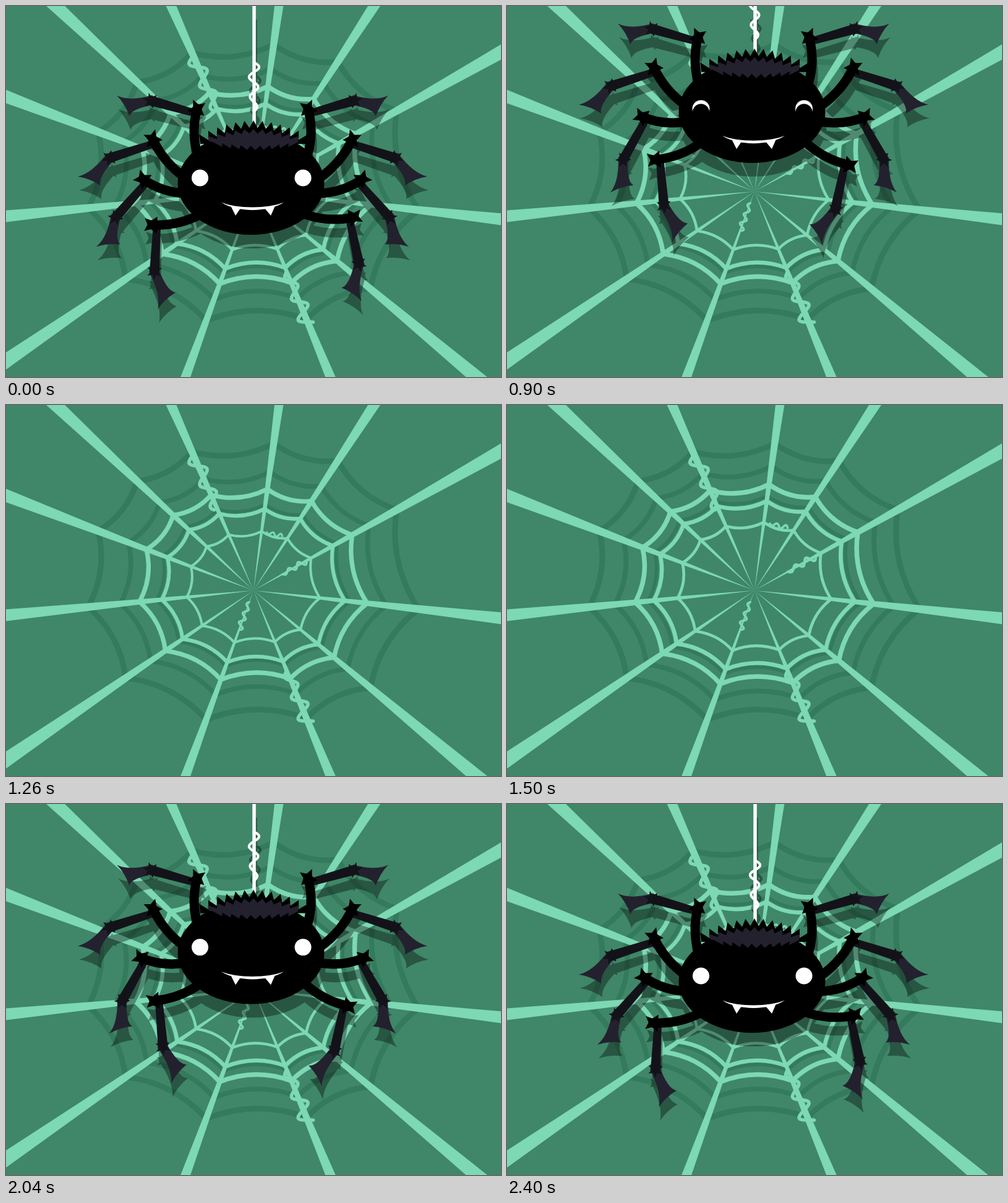
These frames come from a looping animation (800 by 600 pixels, 2820 ms). An HTML page:

```html
<!DOCTYPE html>
<html lang="en">
<head>
<meta charset="utf-8">
<title>Spider on a thread</title>
<style>
  html, body { margin: 0; width: 100%; height: 100%; overflow: hidden; background: #3f8768; }
  svg { display: block; width: 100%; height: 100%; }
  #spider { filter: drop-shadow(2px 22px 0 rgba(0, 0, 0, .36)); }
</style>
</head>
<body>
<svg id="stage" viewBox="0 0 800 600"></svg>
<script>
const LIGHT = '#7dd8b4', SHADE = '#347a5c', SHIN = '#131219', FOOT = '#23212e';
const CX = 400, CY = 300;
const { sin, cos, PI, exp, tanh, hypot } = Math;
const byId = id => document.getElementById(id);
const setTransform = (id, value) => byId(id).setAttribute('transform', value);
const range = (n, make) => Array.from({ length: n }, (_, i) => make(i));
const poly = (pts, fill) => `<polygon points="${pts.join(' ')}" fill="${fill}"/>`;
const line = (d, color, width) =>
  `<path d="${d}" fill="none" stroke="${color}" stroke-width="${width}" stroke-linecap="round"/>`;

// Points given as distance along and across the direction a to b, starting at a
function local([ax, ay], [bx, by], pts) {
  const l = hypot(bx - ax, by - ay), ux = (bx - ax) / l, uy = (by - ay) / l;
  return pts.map(([u, v]) => [ax + ux * u - uy * v, ay + uy * u + ux * v]);
}
const distance = (a, b) => hypot(b[0] - a[0], b[1] - a[1]);
const middle = (a, b) => [(a[0] + b[0]) / 2, (a[1] + b[1]) / 2];

// Wave from a to b whose amplitude goes from a0 to a1
function squiggle(a, b, waves, a0, a1, color, width) {
  const n = 60, len = distance(a, b);
  const pts = range(n + 1, i => [len * i / n, sin(i / n * waves * 2 * PI) * (a0 + (a1 - a0) * i / n)]);
  return line('M' + local(a, b, pts).join('L'), color, width);
}

// Web: spokes at hand-drawn angles, rings in a loose oval
const angles = [-136.8, -113.9, -82.2, -57, -29.4, 6.4, 39.8, 67.5, 110.1, 145.6, 174.3, 201].map(a => a * PI / 180);
const polar = (a, r) => [CX + cos(a) * r, CY + sin(a) * r];
const reach = a => 178 + 15 * cos(2 * a) - 8 * sin(a);
const onSpoke = (i, r) => polar(angles[i], r);

function ring(size) {
  return angles.map((angle, i) => {
    const next = angles[(i + 1) % angles.length];
    const a = polar(angle, reach(angle) * size), b = polar(next, reach(next) * size);
    const chord = distance(a, b);
    const [bend] = local(a, b, [[chord / 2, -chord * .19]]);
    const [sag] = local(a, b, [[chord / 2, chord * .19]]);
    const inner = distance(sag, [CX, CY]) < distance(bend, [CX, CY]) ? sag : bend;
    return `M${a}Q${inner} ${b}`;
  }).join('');
}

const rings = [{ size: 1, width: 7.5 }, { size: .835, width: 6.5 }, { size: .63, width: 4.5 }];
const ringSet = (name, color, grow, extra = '') => rings.map(({ size, width }, i) =>
  `<g id="${name}${i}">${line(ring(size * grow), color, width * (1 + grow) / 2)}${i == 2 ? extra : ''}</g>`).join('');

const knots = squiggle([424, 195], [452, 202], 2, 2, 4, LIGHT, 3.5) +
  squiggle(onSpoke(4, 60), onSpoke(4, 110), 2.5, 3, 6, LIGHT, 4);
const web = ringSet('shade', SHADE, 1.4) + ringSet('ring', LIGHT, 1, knots) +
  angles.map(a => poly([[CX, CY], polar(a - .0235, 540), polar(a + .0235, 540)], LIGHT)).join('') +
  squiggle(onSpoke(1, 240), onSpoke(1, 145), 2.4, 12, 9, LIGHT, 5.5) +
  squiggle(onSpoke(7, 140), onSpoke(7, 232), 2.6, 6, 14, LIGHT, 5.5) +
  squiggle(onSpoke(8, 20), onSpoke(8, 68), 3, 3, 5, LIGHT, 3.5);

// Left legs: hip, knee, ankle, middle of the foot; the right side mirrors them
const MIRROR = 797;
const legs = [
  [[310, 242], [309, 166], [234, 153], [190, 162]],
  [[290, 278], [237, 215], [167, 246], [135, 283]],
  [[292, 303], [221, 280], [177, 342], [166, 387]],
  [[314, 337], [236, 354], [240, 430], [260, 476]]
];

// Fan of spikes around b, facing away from a
function tuft(a, b, spikes, size, color) {
  const reachB = distance(a, b), n = spikes * 2 - 1;
  const pts = range(n, i => {
    const turn = (i / (n - 1) - .5) * 4.2, r = i % 2 ? size * .45 : size;
    return [reachB + cos(turn) * r, sin(turn) * r];
  });
  return poly(local(a, b, pts), color);
}

function leg([hip, knee, ankle, foot]) {
  const [bend] = local(hip, knee, [[distance(hip, knee) / 2, -11]]);
  const [top] = local(knee, bend, [[8, 0]]);
  const len = distance(top, ankle), m = distance(ankle, foot);
  const shin = local(top, ankle, [[0, -6], [len, -8], [len, 8], [0, 6]]);
  const [a, b, toe, arch, heel, c, d] = local(ankle, foot,
    [[-4, 8], [m * .75, 5], [m + 7, 19], [m - 3, 3], [m - 6, -18], [m * .75, -6], [-4, -8]]);
  return `<path d="M${a}Q${b} ${toe}Q${arch} ${heel}Q${c} ${d}Z" fill="${FOOT}"/>` +
    poly(shin, SHIN) + tuft(top, ankle, 5, 13, SHIN) +
    line(`M${hip}Q${bend} ${knee}`, '#000', 15) + tuft(bend, knee, 4, 16, '#000');
}

const legPair = (spec, i) => `<g id="left${i}">${leg(spec)}</g>` +
  `<g transform="translate(${MIRROR}) scale(-1 1)"><g id="right${i}">${leg(spec)}</g></g>`;

// Spiked edge over an arch from x0 to x1; tips lean outwards
function fur(x0, x1, y, rise, spikes, size) {
  const n = spikes * 2;
  return range(n + 1, i => {
    const k = i / n, tip = i % 2;
    return [x0 + (x1 - x0) * k + tip * (k - .5) * 18, y - rise * sin(PI * k) - tip * size];
  });
}
const hairBack = fur(314, 486, 223, 26, 13, 12);
const hairFront = [...fur(328, 472, 219, 13, 11, 7), ...fur(472, 334, 220, -6, 9, -7)];

const eyes = (y, r, fill) =>
  [313.5, 480].map(x => `<circle cx="${x}" cy="${y}" r="${r}" fill="${fill}"/>`).join('');
const face = `<g id="open">${eyes(278, 13.5, '#fff')}</g>` +
  `<g id="shut">${eyes(274, 14, '#fff')}${eyes(279.5, 13.5, '#000')}</g>` +
  '<path fill="#fff" d="M348 317.5C372 328 424 328 449 317.5C424 334 373 334 348 317.5Z' +
  'M363 323L379 327L371 339ZM418 327L435 323L428 339Z"/>';

const wrap = y => squiggle([400.5, y], [400.5, y + 80], 2.5, -9, -5, '#fff', 4);
const spider = line('M401-400V205', '#fff', 5.5) + wrap(91) + wrap(-139) + legs.map(legPair).join('') +
  '<ellipse cx="396" cy="287" rx="118.5" ry="83"/>' + poly(hairBack, '#000') + poly(hairFront, FOOT) +
  `<g id="face">${face}</g>`;

byId('stage').innerHTML =
  `<rect width="800" height="600" fill="#3f8768"/>${web}<g id="spider"><g id="body">${spider}</g></g>`;

// Time runs in steps of 60 ms
const LOOP = 2820, STEP = 60, JUMP = 10, GONE = 20, DROP = 32, LANDED = 40;

function heightAt(n) {
  if (n < JUMP || n >= LANDED) return 0;
  if (n < GONE) return 20 * (n - JUMP) - 8.65 * (n - JUMP) ** 2;
  if (n < DROP) return -700;
  const q = (LANDED - n) / (LANDED - DROP), over = 2.32;
  return 485 * (over * q ** 2 - (over + 1) * q ** 3);
}

const swing = (id, i, angle) => setTransform(id + i, `rotate(${angle} ${legs[i][0]})`);
const zoom = (id, k) => setTransform(id, `translate(${CX} ${CY}) scale(${k}) translate(${-CX} ${-CY})`);

function draw(now) {
  const n = Math.floor(now % LOOP / STEP), y = heightAt(n);
  setTransform('body', `translate(0 ${y})`);

  // Legs spread when the spider hangs low and droop when it is pulled up
  const pull = tanh(y / 16), spread = (up, down) => pull * (pull > 0 ? up : down);
  swing('left', 2, spread(5.5, 12));
  swing('right', 2, spread(5.5, 12));
  swing('left', 3, spread(14, 8));
  swing('right', 3, 9 + spread(5, 24));

  const shut = n > JUMP + 2 && n < GONE;
  byId('open').setAttribute('opacity', shut ? 0 : 1);
  byId('shut').setAttribute('opacity', shut ? 1 : 0);
  setTransform('face', `translate(0 ${shut ? 8.5 : 0})`);

  // The web shivers after the jump
  const u = n - GONE + 1, w = u > 0 && u < 7 ? sin(u * .8) * exp(-.3 * (u - 2)) : 0;
  rings.forEach((_, i) => {
    zoom('ring' + i, 1 - .035 * (i + 1) * w);
    zoom('shade' + i, 1 - .035 * i * w);
  });
}

const start = performance.now();
function tick() {
  draw(performance.now() - start);
  requestAnimationFrame(tick);
}
tick();
</script>
</body>
</html>
```
